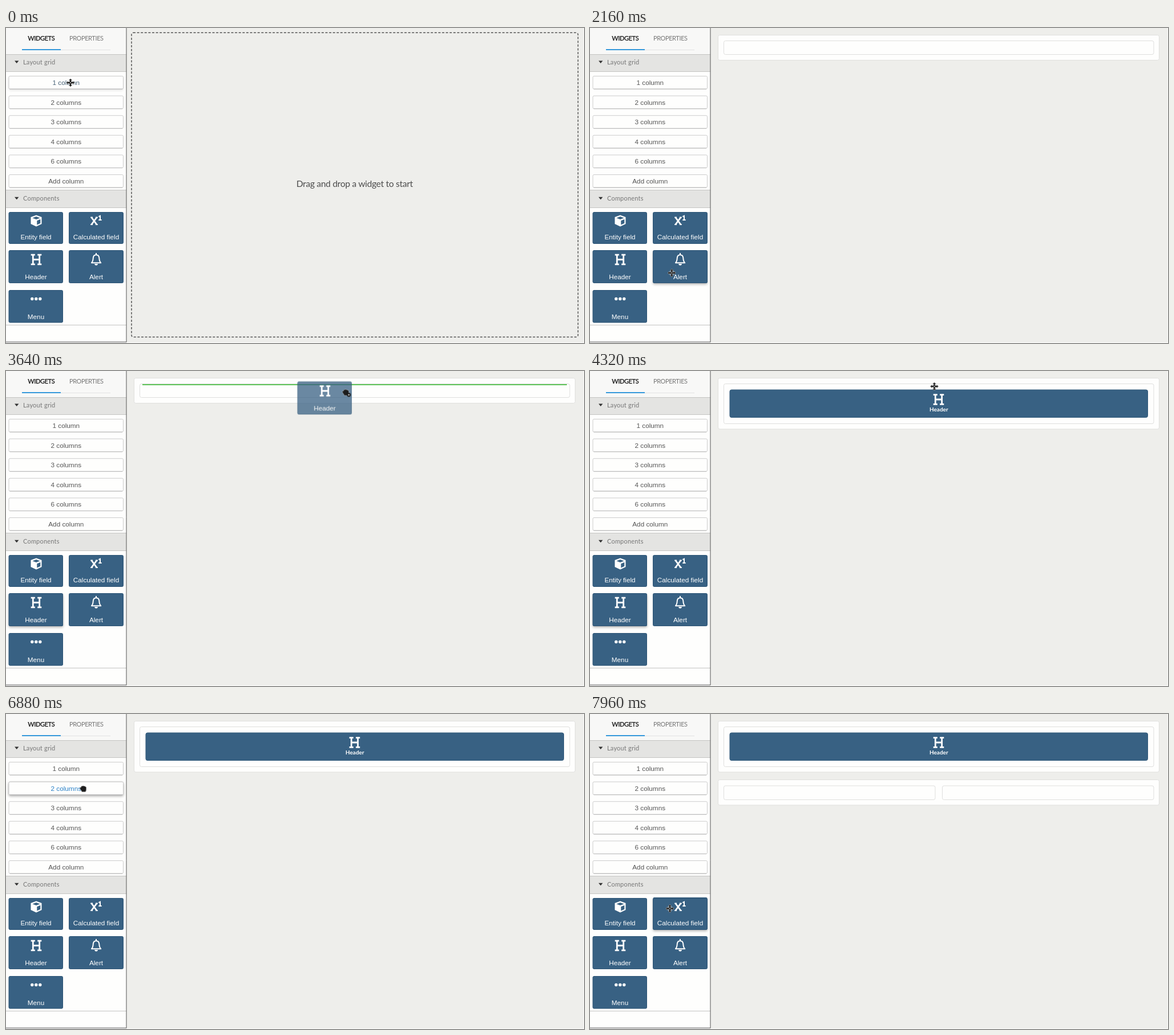
An HTML page that plays this animation: 1013 by 553 pixels, repeating every 8 s.

```html
<!DOCTYPE html>
<html lang="en">
<head>
<meta charset="utf-8">
<title>Layout editor</title>
<style>
html, body { margin: 0; width: 100%; height: 100%; overflow: hidden; background: #fefefd; }
svg { display: block; width: 100%; height: 100%; }
text { text-anchor: middle; font: 11.75px "Liberation Sans", Arial, sans-serif; fill: #555; }
.ui { font-family: Lato, "Open Sans", sans-serif; }
.tab { font-size: 11px; letter-spacing: -.4px; fill: #777; }
.bar text { text-anchor: start; font-size: 11px; letter-spacing: .2px; fill: #777; }
.bar rect { fill: #e4e4e2; }
.bar path { fill: #333; }
.btn rect { fill: #fefefd; stroke: #ccc; }
.btn path { stroke: #bbb; }
.blue text { fill: #2980c8; }
.tile > rect, .block { fill: #386183; stroke: #2c5475; }
.tile text, .block + text { fill: #fff; }
.icon { fill: none; stroke: #fff; }
.solid { fill: #fff; }
.row rect { fill: #fefefd; stroke: #dfdfdd; }
.row .block { fill: #386183; stroke: #325a7b; }
.lift { filter: drop-shadow(0 2px 2px rgba(0, 0, 0, .3)); }
.line { fill: #5fc45a; }
.cut, .fade, .move { animation: 8s linear infinite; }
.cut { animation-timing-function: step-end; }
.ghost { opacity: .75; }

#zone { animation-name: zone; }
#rowEmpty { animation-name: rowEmpty; }
#rowFull { animation-name: rowFull; }
#rowTwo { animation-name: rowTwo; }
#lineTop { animation-name: lineTop; }
#lineCol { animation-name: lineCol; }
#lineRow { animation-name: lineRow; }
#drag1 { animation-name: drag1; }
#dragH { animation-name: dragH; }
#drag2 { animation-name: drag2; }
#cross { animation-name: cross; }
#fist { animation-name: fist; }
#badge { animation-name: badge; }
@keyframes zone { 0% { opacity: 1 } 19%, to { opacity: 0 } }
@keyframes rowEmpty { 0%, 53%, to { opacity: 0 } 19% { opacity: 1 } }
@keyframes rowFull { 0% { opacity: 0 } 53%, to { opacity: 1 } }
@keyframes rowTwo { 0% { opacity: 0 } 94.5%, to { opacity: 1 } }
@keyframes lineTop { 0%, 19%, to { opacity: 0 } 11% { opacity: 1 } }
@keyframes lineCol { 0%, 53%, to { opacity: 0 } 44.5% { opacity: 1 } }
@keyframes lineRow { 0%, 94.5%, to { opacity: 0 } 89.5% { opacity: 1 } }
@keyframes drag1 { 0%, 19%, to { opacity: 0 } 7% { opacity: 1 } }
@keyframes dragH { 0%, 53%, to { opacity: 0 } 33.5% { opacity: 1 } }
@keyframes drag2 { 0%, 94.5%, to { opacity: 0 } 87% { opacity: 1 } }
@keyframes cross { 0%, 19%, 53%, 94.5%, to { opacity: 1 } 5%, 32.5%, 85.5% { opacity: 0 } }
@keyframes fist { 0%, 19%, 53%, 94.5%, to { opacity: 0 } 5%, 32.5%, 85.5% { opacity: 1 } }
@keyframes badge { 0%, 19%, 53%, 94.5%, to { opacity: 0 } 7%, 33.5%, 87% { opacity: 1 } }

#hot1 { animation-name: hot1; }
#hot2 { animation-name: hot2; }
#hotH { animation-name: hotH; }
#hotA { animation-name: hotA; }
#hotC { animation-name: hotC; }
@keyframes hot1 { 0% { opacity: .3 } 3%, 22.5% { opacity: 1 } 24%, to { opacity: 0 } }
@keyframes hot2 { 0%, 82.5% { opacity: 0 } 84.5%, 94.5% { opacity: 1 } 96%, to { opacity: 0 } }
@keyframes hotH { 0%, 28.5% { opacity: 0 } 30%, 74.5% { opacity: 1 } 76%, to { opacity: 0 } }
@keyframes hotA { 0%, 25.5% { opacity: 0 } 27%, 28% { opacity: 1 } 30%, to { opacity: 0 } }
@keyframes hotC { 0%, 97.5% { opacity: 0 } 99%, to { opacity: 1 } }

#cursor { animation-name: cursor; }
#path1 { animation-name: path1; }
#pathH { animation-name: pathH; }
#path2 { animation-name: path2; }
@keyframes cursor {
  0% { transform: translate(113px, 96px) }
  6% { transform: translate(113px, 96px); animation-timing-function: cubic-bezier(.5, 0, .75, .55) }
  11% { transform: translate(216px, 79px) }
  12.5% { transform: translate(272px, 71px); animation-timing-function: cubic-bezier(.25, .5, .5, 1) }
  18.5% { transform: translate(386px, 120px) }
  22.5% { transform: translate(386px, 120px); animation-timing-function: cubic-bezier(.45, 0, .7, .75) }
  27% { transform: translate(143.5px, 430px); animation-timing-function: ease-out }
  32%, 33% { transform: translate(85px, 408px); animation-timing-function: cubic-bezier(.4, 0, .75, .7) }
  39% { transform: translate(441px, 188px); animation-timing-function: cubic-bezier(.25, .5, .6, .9) }
  43% { transform: translate(578px, 60px); animation-timing-function: ease-out }
  48% { transform: translate(603.5px, 27px) }
  74.5% { transform: translate(603.5px, 27px); animation-timing-function: ease-in-out }
  84.5% { transform: translate(135.5px, 131px) }
  86% { transform: translate(135.5px, 131px); animation-timing-function: ease-in-out }
  92.5% { transform: translate(420px, 150px) }
  94.5% { transform: translate(420px, 150px); animation-timing-function: ease-in-out }
  99.5%, to { transform: translate(140px, 341.5px) }
}
@keyframes path1 {
  0% { transform: translate(0, 0) }
  6% { transform: translate(0, 0); animation-timing-function: cubic-bezier(.5, 0, .75, .55) }
  11% { transform: translate(85px, -14px) }
  12.5% { transform: translate(143px, -19px); animation-timing-function: cubic-bezier(.25, .5, .5, 1) }
  19%, to { transform: translate(267px, 28px) }
}
@keyframes pathH {
  0% { transform: translate(0, 0) }
  33% { transform: translate(0, 0); animation-timing-function: cubic-bezier(.5, 0, .75, .7) }
  39% { transform: translate(320px, -215.5px); animation-timing-function: cubic-bezier(.25, .5, .6, .9) }
  43% { transform: translate(480px, -340px); animation-timing-function: ease-out }
  48%, to { transform: translate(518px, -386px) }
}
@keyframes path2 {
  0% { transform: translate(0, 0) }
  86.3% { transform: translate(0, 0); animation-timing-function: ease-in-out }
  92.5%, to { transform: translate(285px, 19px) }
}
</style>
</head>
<body>
<svg viewBox="0 0 1013 553" preserveAspectRatio="none">
  <defs>
    <path id="slab" class="icon" stroke-width="2.8" d="M-5.7-8.5V8.5M5.7-8.5V8.5M-5.7 0H5.7M-9.3-8.3H-2.2M2.2-8.3H9.3M-9.3 8.3H-2.2M2.2 8.3H9.3"/>
    <rect id="shade" class="lift" width="95" height="57" rx="2" fill="#386183"/>
    <g id="btn" class="btn">
      <rect x="5" y=".5" width="200.5" height="22.5" rx="2"/>
      <path d="M6.5 23.2H204"/>
    </g>
    <g id="tileH" class="tile">
      <rect x="5" y="390.5" width="94.5" height="57" rx="2"/>
      <use href="#slab" x="53" y="406.5"/>
      <text x="52.5" y="441">Header</text>
    </g>
  </defs>

  <!-- canvas -->
  <path fill="#eeeeeb" d="M211 0H1012V552H211z"/>
  <g id="zone" class="cut">
    <rect x="220" y="8.3" width="782.5" height="534.2" rx="3" fill="none" stroke="#555" stroke-width="1.5" stroke-dasharray="4 2.6"/>
    <text class="ui" x="611" y="279" style="font-size:15.5px;letter-spacing:-.26px;fill:#4c4c4c">Drag and drop a widget to start</text>
  </g>
  <g id="rowEmpty" class="cut row">
    <rect x="224.5" y="12.5" width="773" height="44" rx="3"/>
    <rect x="234.5" y="22.5" width="753.5" height="24" rx="3"/>
  </g>
  <g id="rowFull" class="cut row">
    <rect x="224.5" y="12.5" width="773" height="89.5" rx="3"/>
    <rect x="234.5" y="22.5" width="753.5" height="70" rx="3"/>
    <rect class="block" x="245" y="33" width="732.5" height="48.5" rx="3"/>
    <text class="ui" x="611.3" y="71" style="font-size:10px;font-weight:700">Header</text>
    <use href="#slab" x="611" y="50"/>
  </g>
  <g id="rowTwo" class="cut row">
    <rect x="224.5" y="115.5" width="773" height="44.5" rx="3"/>
    <rect x="234.5" y="126" width="370.5" height="24.5" rx="3"/>
    <rect x="617.5" y="126" width="370.5" height="24.5" rx="3"/>
  </g>

  <!-- sidebar -->
  <path fill="#fefefd" d="M0 0H211V552H0z"/>
  <path fill="#f8f8f7" d="M0 0H211V46H0z"/>
  <text class="ui tab" x="61.8" y="21.5" style="fill:#222;font-weight:500;stroke:#222;stroke-width:.25">WIDGETS</text>
  <text class="ui tab" x="140.8" y="21.5">PROPERTIES</text>
  <path stroke="#e2e2e2" d="M96 38.5H183"/>
  <path fill="#3498db" d="M28 37H96V39H28z"/>
  <g class="bar">
    <rect y="46" width="211" height="30.5"/>
    <path d="M15 57.5H22.4L18.7 62z"/>
    <text class="ui" x="30" y="64">Layout grid</text>
    <rect y="284.5" width="211" height="31"/>
    <path d="M15 296.8H22.4L18.7 301.3z"/>
    <text class="ui" x="30" y="303.3">Components</text>
  </g>
  <path stroke="#c4c4c2" fill="none" d="M0 46.5H211M0 76.5H211M0 284.5H211M0 315.5H211M0 521.5H211"/>
  <g id="buttons"></g>

  <g id="hot1" class="fade blue">
    <use class="lift" href="#btn" y="84"/>
    <text x="105.3" y="100">1 column</text>
  </g>
  <g id="hot2" class="fade blue">
    <use class="lift" href="#btn" y="118.7"/>
    <text x="105.3" y="134.6">2 columns</text>
  </g>
  <g id="hotH" class="fade"><use href="#shade" x="5" y="391"/></g>
  <g id="hotA" class="fade"><use href="#shade" x="110.5" y="391"/></g>
  <g id="hotC" class="fade"><use href="#shade" x="110.5" y="322"/></g>

  <g class="tile">
    <rect x="5" y="323.5" width="94.5" height="55" rx="2"/>
    <path class="solid" d="M53 328.5L62.5 332V344L53 348.5L43.5 344V332z"/>
    <path fill="#386183" d="M53 331L59.6 333.4L53 336L46.4 333.4zM54.3 338.3L60.3 335.8V342.8L54.3 345.6z"/>
    <text x="52.5" y="371">Entity field</text>
  </g>
  <g class="tile">
    <rect x="110.5" y="323.5" width="95" height="55" rx="2"/>
    <path class="icon" stroke-width="2.8" d="M149.8 332.5L159 345M159 332.5L149.8 345"/>
    <path class="icon" stroke-width="2" d="M148.2 332.5H152M157 332.5H160.8M148.2 345H152M157 345H160.8M162.3 331.2L165 329.8V337M162.3 337H167.6"/>
    <text x="158" y="371">Calculated field</text>
  </g>
  <use href="#tileH"/>
  <g class="tile">
    <rect x="110.5" y="390.5" width="95" height="57" rx="2"/>
    <path class="icon" stroke-width="2" stroke-linejoin="round" d="M150 412.3C152.6 409.5 152.6 407 152.8 403.5C153.2 400 155 398.3 158 398.3S162.900 400 163.300 403.500C163.500 407 163.500 409.500 166.200 412.300z"/>
    <path class="solid" d="M157 395H159V398.500H157zM155.300 414H160.900A2.800 2.800 0 0 1 155.300 414z"/>
    <text x="158" y="441">Alert</text>
  </g>
  <g class="tile">
    <rect x="5" y="460.5" width="94.5" height="56.5" rx="2"/>
    <g class="solid">
      <circle cx="45.800" cy="475.500" r="2.700"/>
      <circle cx="52.800" cy="475.500" r="2.700"/>
      <circle cx="59.800" cy="475.500" r="2.700"/>
    </g>
    <text x="52.5" y="510.5">Menu</text>
  </g>
  <path fill="none" stroke="#555" d="M211 0V551.500M0 551.200H211"/>

  <!-- drop markers -->
  <rect id="lineTop" class="cut line" x="216" width="791" height="2"/>
  <rect id="lineCol" class="cut line" x="239" y="23" width="744" height="2"/>
  <rect id="lineRow" class="cut line" x="225" y="107" width="773" height="2"/>

  <!-- dragged copies -->
  <g id="drag1" class="cut"><g id="path1" class="move"><g class="ghost blue">
    <use href="#btn" y="84.500"/>
    <text x="105.300" y="100.500">1 column</text>
  </g></g></g>
  <g id="dragH" class="cut"><g id="pathH" class="move"><use class="ghost" href="#tileH"/></g></g>
  <g id="drag2" class="cut"><g id="path2" class="move"><g class="ghost blue">
    <use href="#btn" y="118.700"/>
    <text x="105.300" y="134.600">2 columns</text>
  </g></g></g>

  <g id="cursor" class="move">
    <g id="cross" class="cut">
      <path fill="#222" stroke="#e8e8e8" stroke-width="1" paint-order="stroke" d="M0-7L2.800-4H1V-2.200H2.200V-1H4V-2.800L7 0L4 2.800V1H2.200V2.200H1V4H2.800L0 7L-2.800 4H-1V2.200H-2.200V1H-4V2.800L-7 0L-4-2.800V-1H-2.200V-2.200H-1V-4H-2.800z"/>
      <circle r="1" fill="#ddd"/>
    </g>
    <g id="fist" class="cut">
      <path fill="#1c1c1c" stroke="#f4f4f4" stroke-width=".8" paint-order="stroke" d="M-5.800-1.500Q-5.300-2.800-3.800-2V-3.600Q-3-5.200-1.600-4.200Q-.400-5.600.900-4.300Q2.400-5.100 3.200-3.600Q5-3.800 5 -2V1.500Q5 3.500 3.600 5.500H-2.500Q-3.200 3.500-4.800 1.800Q-6.200 0-5.800-1.500z"/>
    </g>
    <g id="badge" class="cut">
      <circle cx="5.300" cy="4.500" r="3.400" fill="#1c1c1c"/>
      <path stroke="#fff" stroke-width=".9" d="M3.900 4.500H6.700M5.300 3.100V5.900"/>
    </g>
  </g>
</svg>
<script>
const labels = ["1 column", "2 columns", "3 columns", "4 columns", "6 columns", "Add column"];
document.getElementById("buttons").innerHTML = labels.map((label, i) => {
  const y = 84 + i * 34.6;
  return `<use href="#btn" y="${y}"/><text x="105.3" y="${y + 16}">${label}</text>`;
}).join("");
</script>
</body>
</html>
```
